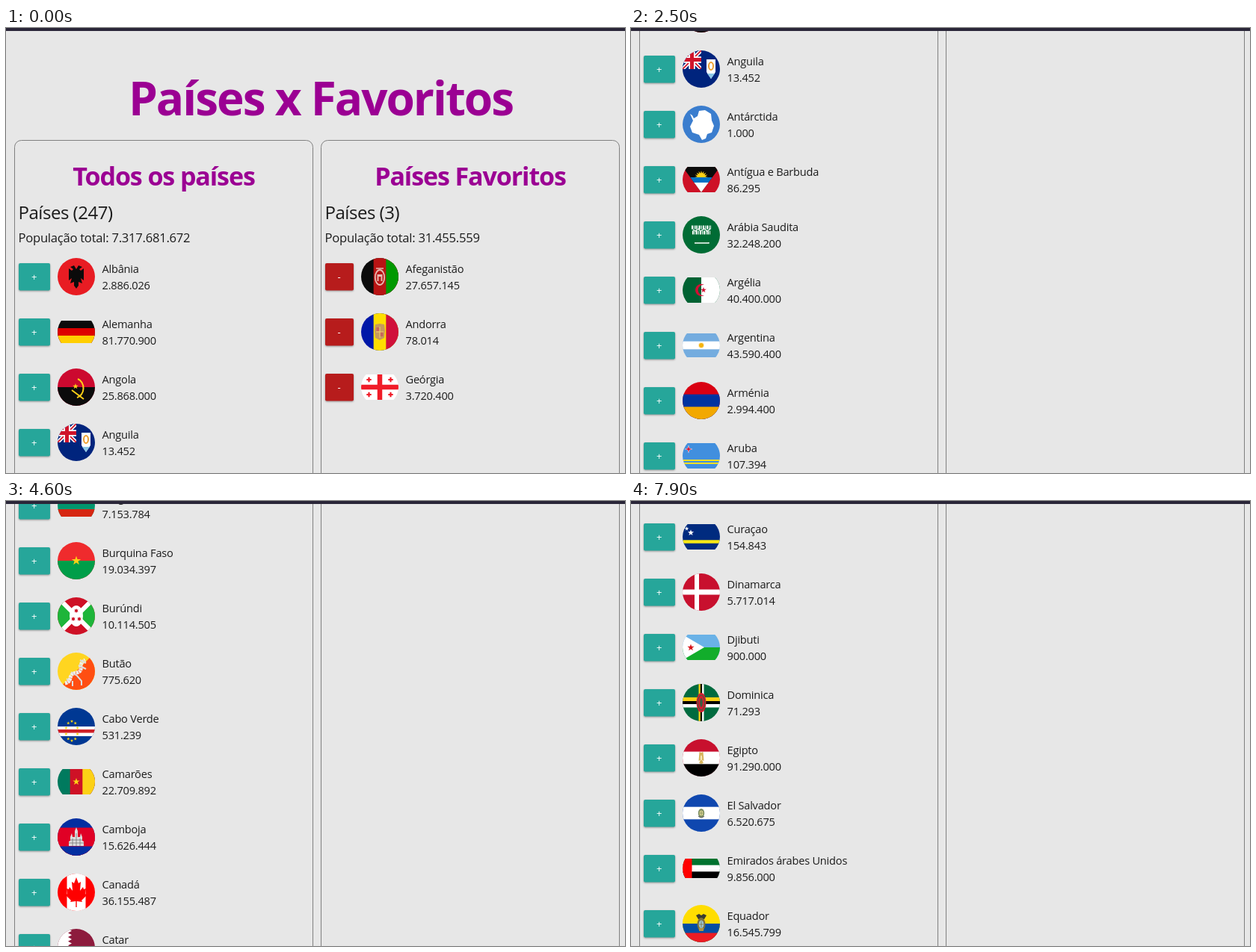
Animation, 828 px wide and 596 px high, one loop 8 s. Source, as an HTML page:

```html
<!DOCTYPE html>
<html lang="pt">
<head>
<meta charset="utf-8">
<title>Países x Favoritos</title>
<style>
html, body { margin: 0; width: 100%; height: 100%; overflow: hidden; background: #e7e7e7; }
#stage { display: block; width: 828px; height: 596px; }
text { font: 14.6px "Open Sans", "Noto Sans", sans-serif; letter-spacing: -.015em; fill: #1c1c1c; }
.title, .heading { font-size: 62px; font-weight: 700; letter-spacing: -.032em; fill: #9b0093; text-anchor: middle; }
.heading { font-size: 34px; }
.count { font-size: 24px; letter-spacing: -.02em; }
.total { font-size: 16.6px; }
.sign { font-size: 13px; fill: #fff; text-anchor: middle; }
.panel { fill: none; stroke: #808080; }
.button { filter: drop-shadow(0 1.5px 1.3px rgba(0, 0, 0, .36)); }
#page { animation: scroll 8s step-end infinite; }
@keyframes scroll {
  0% { transform: translateY(0); }
  16.25% { transform: translateY(-40px); }
  17.5% { transform: translateY(-150px); }
  18.75% { transform: translateY(-200px); }
  27.5% { transform: translateY(-201px); }
  28.75% { transform: translateY(-300px); }
  30% { transform: translateY(-440px); }
  31.25% { transform: translateY(-500px); }
  36.25% { transform: translateY(-520px); }
  37.5% { transform: translateY(-680px); }
  38.75% { transform: translateY(-840px); }
  40% { transform: translateY(-978px); }
  41.25% { transform: translateY(-1070px); }
  42.5% { transform: translateY(-1100px); }
  45% { transform: translateY(-1180px); }
  46.25% { transform: translateY(-1400px); }
  47.5% { transform: translateY(-1581px); }
  48.75% { transform: translateY(-1672px); }
  50% { transform: translateY(-1700px); }
  52.5% { transform: translateY(-1725px); }
  53.75% { transform: translateY(-1880px); }
  55% { transform: translateY(-2080px); }
  56.25% { transform: translateY(-2290px); }
  57.5% { transform: translateY(-2473px); }
  58.75% { transform: translateY(-2573px); }
  60% { transform: translateY(-2600px); }
  63.75% { transform: translateY(-2680px); }
  65% { transform: translateY(-2950px); }
  66.25% { transform: translateY(-3200px); }
  67.5% { transform: translateY(-3350px); }
  68.75% { transform: translateY(-3400px); }
  90% { transform: translateY(-3480px); }
  91.25% { transform: translateY(-3800px); }
  92.5% { transform: translateY(-4050px); }
  93.75% { transform: translateY(-4140px); }
  96.25% { transform: translateY(-4155px); }
  98.75%, 100% { transform: translateY(-4133px); }
}
</style>
</head>
<body>
<svg id="stage" viewBox="0 0 828 596">
  <defs><clipPath id="disc"><circle r="25"/></clipPath></defs>
  <g id="page">
    <text class="title" x="421" y="117">Países x Favoritos</text>
    <rect class="panel" x="11.5" y="150.5" width="399" height="18600" rx="9"/>
    <rect class="panel" x="421.5" y="150.5" width="399" height="18600" rx="9"/>
    <text class="heading" x="211" y="211">Todos os países</text>
    <text class="heading" x="621" y="211">Países Favoritos</text>
    <text class="count" x="16.5" y="256">Países (247)</text>
    <text class="count" x="426.5" y="256">Países (3)</text>
    <text class="total" x="16.5" y="287">População total: 7.317.681.672</text>
    <text class="total" x="426.5" y="287">População total: 31.455.559</text>
    <g id="all"></g>
    <g id="favorites"></g>
  </g>
  <rect width="828" height="4" fill="#2a2638"/>
</svg>
<script>
// Flag shapes: every flag is 50 wide and h high, origin at its top left.
const rect = (x, y, w, h, c) => `<rect x="${x}" y="${y}" width="${w}" height="${h}" fill="${c}"/>`;
const field = c => rect(0, 0, 50, 50, c);
const rows = (h, ...cs) => cs.map((c, i) => rect(0, i * h / cs.length, 50, h - i * h / cs.length, c)).join('');
const cols = (h, ...cs) => cs.map((c, i) => rect(i * 50 / cs.length, 0, 50 - i * 50 / cs.length, h, c)).join('');
const oval = (x, y, rx, ry, c, more = '') => `<ellipse cx="${x}" cy="${y}" rx="${rx}" ry="${ry}" fill="${c}" ${more}/>`;
const dot = (x, y, r, c) => oval(x, y, r, r, c);
const ring = (x, y, rx, ry, c, w) => oval(x, y, rx, ry, 'none', `stroke="${c}" stroke-width="${w}"`);
const poly = (c, pts) => `<polygon points="${pts}" fill="${c}"/>`;
const line = (c, w, d, dash = '') => `<path d="${d}" fill="none" stroke="${c}" stroke-width="${w}" stroke-dasharray="${dash}"/>`;
const range = n => [...Array(n).keys()];

function star(x, y, r, c, n = 5, inner = .4) {
  return poly(c, range(2 * n).map(i => {
    const a = i * Math.PI / n, q = i % 2 ? r * inner : r;
    return `${(x + q * Math.sin(a)).toFixed(2)},${(y - q * Math.cos(a)).toFixed(2)}`;
  }).join(' '));
}
// Left half of an outline, mirrored about the middle.
function mirrored(c, half) {
  const pts = half.split(' ').map(p => p.split(','));
  return poly(c, [...pts, ...pts.slice().reverse().map(([x, y]) => [50 - x, y])].join(' '));
}
function crescent(x, y, r, c) {
  const a = x + r * .5, d = r * .866, q = r * .88;
  return `<path fill="${c}" d="M${a} ${y - d}A${r} ${r} 0 1 0 ${a} ${y + d}A${q} ${q} 0 1 1 ${a} ${y - d}"/>`;
}
function jack(w, h, blue) {
  const cross = `M${w / 2} 0V${h}M0 ${h / 2}H${w}`, saltire = `M0 0L${w} ${h}M${w} 0L0 ${h}`;
  return `<svg width="${w}" height="${h}">` + field(blue) + line('#fff', h / 5, saltire) +
    line('#cf142b', h / 14, saltire) + line('#fff', h / 3, cross) + line('#cf142b', h / 5, cross) + '</svg>';
}
function teeth(h, n, x, tip, c) {
  const step = h / n;
  return poly(c, '0,0 ' + range(n).map(i => `${x},${i * step} ${tip},${(i + .5) * step}`).join(' ') + ` ${x},${h} 0,${h}`);
}
const seal = (x, y, rx, ry, a, b) => oval(x, y, rx, ry, a) + oval(x, y, rx * .6, ry * .6, b) +
  line(a, .8, `M${x - rx * .5} ${y}h${rx}M${x} ${y - ry * .5}v${ry}`);

const gold = '#ffd116', red = '#ce1126', white = '#fff', black = '#0b0b0b';

const countries = [
  ['Albânia', '2.886.026', 50, field('#e81c23') +
    mirrored(black, '25,15 22,10 17,12 21,15 19,17 15,14 15,30 19,27 17,34 22,32 22,37 25,41')],
  ['Alemanha', '81.770.900', 30, rows(30, black, '#d00', '#ffce00')],
  ['Angola', '25.868.000', 50, rows(50, '#cc092f', black) +
    line(gold, 2, 'M27 14A11 13 0 0 1 26 39M19 29L35 41') + star(24, 24, 4, gold)],
  ['Anguila', '13.452', 50, field('#00247d') + jack(25, 25, '#00247d') +
    poly(white, '32,12 44,12 44,29 38,38 32,29') + poly('#8cc8e8', '33,31 43,31 38,38') +
    ring(38, 21, 3, 5, '#f0a030', 2)],
  ['Antárctida', '1.000', 50, field('#3a7dce') +
    poly(white, '10,11 13,13 15,17 20,14 22,7 30,6 38,11 39,20 42,27 39,36 33,38 31,44 26,46 22,39 13,36 10,28 14,20')],
  ['Antígua e Barbuda', '86.295', 34, field(red) + poly(black, '0,0 50,0 25,34') + star(25, 14, 9, gold, 16, .6) +
    poly('#0072c6', '10.3,14 39.7,14 34.6,21 15.4,21') + poly(white, '15.4,21 34.6,21 25,34')],
  ['Arábia Saudita', '32.248.200', 50, field('#006c35') +
    line(white, 5, 'M12 15h26M13 22h25', '2 1 1 1') + line(white, 1.3, 'M14 18l3 2 4-3 3 3 5-3 4 3 4-3M16 36h19v-1')],
  ['Argélia', '40.400.000', 34, cols(34, '#006233', white) + crescent(25, 17, 8, '#d21034') + star(28, 17, 4, '#d21034')],
  ['Argentina', '43.590.400', 32, rows(32, '#74acdf', white, '#74acdf') + star(25, 16, 4, '#f6b40e', 16, .7)],
  ['Arménia', '2.994.400', 50, rows(50, '#d90012', '#0033a0', '#f2a800')],
  ['Aruba', '107.394', 34, field('#418fde') + rect(0, 22, 50, 2, '#fbe122') + rect(0, 26, 50, 2, '#fbe122') +
    star(8, 8, 5.5, white, 4, .35) + star(8, 8, 4.5, '#d21034', 4, .3)],
  ['Austrália', '24.117.360', 26, field('#00008b') + jack(25, 13, '#00008b') + star(12.5, 19.5, 3.8, white, 7, .5) +
    star(38, 4.5, 1.8, white, 7) + star(32, 11, 1.8, white, 7) + star(43, 9, 1.8, white, 7) + star(38, 21, 1.8, white, 7)],
  ['áustria', '8.725.931', 50, rows(50, '#ed2939', white, '#ed2939')],
  ['Azerbaijão', '9.730.500', 50, rows(50, '#0098c3', '#e00034', '#00ae65') +
    ring(24.5, 25, 3.4, 6.5, white, 1.6) + rect(26, 20, 3, 10, '#e00034') + star(28, 25, 3.2, white, 8, .5)],
  ['Baamas', '378.040', 50, rows(50, '#00abc9', '#fae042', '#00abc9') + poly('#000', '0,0 22,25 0,50')],
  ['Bangladeche', '161.006.790', 30, field('#006a4e') + dot(22.5, 15, 10, '#f42a41')],
  ['Barbados', '285.000', 34, cols(34, '#00267f', '#ffc726', '#00267f') +
    line('#000', 1.8, 'M25 8V26M19 10q2 4 1 10h10q-1-6 1-10')],
  ['Barém', '1.404.900', 30, field(red) + teeth(30, 5, 13, 21, white)],
  ['Bélgica', '11.319.511', 50, cols(50, '#111', '#fae042', '#ed2939')],
  ['Belize', '370.300', 50, field('#003f87') + rect(0, 0, 50, 5, red) + rect(0, 45, 50, 5, red) +
    oval(25, 25, 13, 21, white) + ring(25, 25, 11, 18, '#5a9b45', 1.5) +
    poly('#7fb2d5', '19,20 31,20 30,30 25,35 20,30') + rect(18, 22, 4, 11, '#a56c42') +
    rect(29, 22, 3, 11, '#5b432f') + oval(25, 16, 6, 4, '#448a3e') + rect(22, 24, 6, 6, gold)],
  ['Benim', '10.653.654', 34, rows(34, '#fcd116', '#e8112d') + rect(0, 0, 20, 34, '#008751')],
  ['Bermudas', '61.954', 50, field('#cf142b') + jack(25, 25, '#00247d') + rect(32, 12, 12, 26, white) +
    rect(32, 32, 12, 7, '#2f8b3a') + oval(38, 24, 4, 8, '#b3343a') + oval(38, 24, 2, 4, '#6d8b99')],
  ['Bielorrússia', '9.498.700', 26, field('#c8313e') + rect(0, 17, 50, 9, '#4aa657') + rect(0, 0, 6, 26, white) +
    line('#c8313e', 1.5, 'M1.5 0V26M4.5 1V26', '2 1')],
  ['Bolívia', '10.985.059', 50, rows(50, '#d52b1e', '#f9e300', '#007934')],
  ['Bonaire', '17.408', 50, field(white) + poly('#003087', '50,4 50,50 4,50') + poly('#f9d616', '0,0 21,0 0,19') +
    ring(14, 21, 6.5, 9, '#000', 1.3) + line('#000', 1.5, 'M14 10v3M14 29v3M6 21h3M19 21h3') + star(14, 21, 6, '#dc143c', 6, .55)],
  ['Bósnia e Herzegovina', '3.531.159', 25, field('#002395') + poly('#fecb00', '13,0 38,0 38,25') +
    range(7).map(i => star(10 + i * 4, i * 4, 2, white)).join('')],
  ['Botsuana', '2.141.206', 34, field('#75aadb') + rect(0, 12, 50, 10, white) + rect(0, 14, 50, 6, '#000')],
  ['Brasil', '206.135.893', 34, field('#009c3b') + poly('#ffdf00', '4,17 25,3 46,17 25,31') + dot(25, 17, 8, '#002776') +
    line(white, 1.2, 'M17 15q9-1 15 5')],
  ['Brunei', '411.900', 25, field('#f7e017') + poly(white, '0,0 50,17 50,24 0,7') + poly('#000', '0,7 50,24 50,29 0,12') +
    line('#cf1126', 1.6, 'M18 11q7 9 14 0M25 4V20')],
  ['Bulgária', '7.153.784', 30, rows(30, white, '#00966e', '#d62612')],
  ['Burquina Faso', '19.034.397', 50, rows(50, '#ef2b2d', '#009e49') + star(25, 25, 6.5, '#fcd116')],
  ['Burúndi', '10.114.505', 50, field(red) + poly('#1eb53a', '0,0 25,25 0,50') + poly('#1eb53a', '50,0 25,25 50,50') +
    line(white, 6, 'M0 0L50 50M50 0L0 50') + oval(25, 25, 9, 14, white) +
    star(25, 18, 3, red, 6, .55) + star(21, 29, 3, red, 6, .55) + star(29, 29, 3, red, 6, .55)],
  ['Butão', '775.620', 50, field('#ffd520') + poly('#ff4e12', '50,0 50,50 0,50') +
    line('#eee', 5, 'M10 41q6-1 7-7t8-7 6-7 6-10', '3 .6') +
    line('#ddd', 2, 'M12 35l5 4M20 38v7M18 26l8 5 6 7v6M28 17l10 5M30 10l8 4')],
  ['Cabo Verde', '531.239', 50, field('#003893') + rect(0, 25, 50, 13, white) + rect(0, 29, 50, 4.5, '#cf2027') +
    range(10).map(i => star(19 + 8 * Math.sin(i * .628), 31 + 13 * Math.cos(i * .628), 2.3, '#f7d116')).join('')],
  ['Camarões', '22.709.892', 34, cols(34, '#007a5e', red, '#fcd116') + star(25, 17, 5, '#fcd116')],
  ['Camboja', '15.626.444', 50, rows(50, '#032ea1', '#e00025', '#e00025', '#032ea1') +
    mirrored('#ddd', '25,12 23,17 23,25 20,25 19,20 17,25 17,30 15,31 15,37 25,37') +
    line('#777', .8, 'M15 33H35M17 29H33M20 27v10M25 20v17M30 27v10')],
  ['Canadá', '36.155.487', 50, cols(50, '#f00', white, white, '#f00') +
    mirrored('#f00', '25,5 22,13 19,11 20,23 16,18 15,21 12,20 13,27 11,29 18,36 17,38 24.3,37 24.3,45')],
  ['Catar', '2.587.564', 50, field('#8d1b3d') + teeth(50, 9, 14, 19, white)],
  ['Cazaquistão', '17.753.200', 25, field('#00afca') + star(25, 10, 6, '#fec50c', 18, .7) +
    line('#fec50c', 1.5, 'M15 15q10 9 20 0M2 0V25')],
  ['Chade', '14.497.000', 34, cols(34, '#002664', '#fecb00', '#c60c30')],
  ['Chile', '18.191.900', 34, rows(34, white, '#d52b1e') + rect(0, 0, 17, 17, '#0039a6') + star(8.5, 8.5, 4.5, white)],
  ['China', '1.377.422.166', 34, field('#de2910') + star(9, 9, 5, '#ffde00') +
    range(4).map(i => star(18 - Math.abs(i - 1.5), 4 + i * 4, 1.6, '#ffde00')).join('')],
  ['Chipre', '847.000', 50, field(white) +
    poly('#d57800', '38,9 32,14 24,15 21,20 14,20 11,26 15,30 19,30 25,28 30,26 32,21 31,18') +
    line('#68734a', 2, 'M13 33q4 7 11 8M37 32q-4 8-11 9', '2 1')],
  ['Colômbia', '48.759.958', 50, rows(50, gold, gold, '#003893', red)],
  ['Comores', '806.153', 50, rows(50, '#ffc61e', white, red, '#3a75c4') + poly('#3d8e33', '0,0 25,25 0,50') +
    line(white, 2.6, 'M10 14Q-1 25 10 36') + line(white, 2, 'M10 17V34', '2 2.7')],
  ['Congo', '4.741.000', 34, field('#009543') + poly('#fbde4a', '0,34 33,0 50,0 17,34') + poly('#dc241f', '50,0 50,34 17,34')],
  ['Coreia do Norte', '25.281.000', 26, field('#024fa2') + rect(0, 4, 50, 18, white) + rect(0, 5.5, 50, 15, '#ed1c27') +
    dot(17, 13, 6, white) + star(17, 13, 5.5, '#ed1c27')],
  ['Coreia do Sul', '50.801.405', 34, field(white) + dot(25, 17, 8.5, '#c60c30') +
    '<path fill="#003478" d="M18 12.3a4.2 4.2 0 0 0 7 4.7a4.2 4.2 0 0 1 7 4.7a8.5 8.5 0 0 1-14-9.4"/>' +
    [[12, 8, -56], [38, 8, 56], [12, 26, 56], [38, 26, -56]].map(([x, y, a]) =>
      `<g transform="translate(${x} ${y}) rotate(${a})">${line('#000', 1.5, 'M-4-2.6h8M-4 0h8M-4 2.6h8', a > 0 ? '3.6 .8' : '')}</g>`).join('')],
  ['Costa do Marfim', '22.671.331', 50, cols(50, '#f77f00', white, '#009e60')],
  ['Costa Rica', '4.890.379', 30, rows(30, '#002b7f', white, red, red, white, '#002b7f')],
  ['Croácia', '4.190.669', 25, rows(25, '#f00', white, '#171796') + rect(20, 6, 10, 12, '#f00') +
    line(white, 2, 'M21 9h8M21 13h8', '2 2')],
  ['Cuba', '11.239.004', 25, rows(25, '#002a8f', white, '#002a8f', white, '#002a8f') +
    poly('#cf142b', '0,0 21,12.5 0,25') + star(7, 12.5, 4, white)],
  ['Curaçao', '154.843', 34, field('#002b7f') + rect(0, 21.3, 50, 4.4, '#f9e814') + star(5.5, 6, 3, white) + star(11, 11.5, 4.3, white)],
  ['Dinamarca', '5.717.014', 50, field('#c8102e') + rect(16, 0, 6, 50, white) + rect(0, 21.5, 50, 7, white)],
  ['Djibuti', '900.000', 34, rows(34, '#6ab2e7', '#12ad2b') + poly(white, '0,0 29,17 0,34') + star(11, 17.3, 4.8, '#d7141a')],
  ['Dominica', '71.293', 50, field('#006b3f') +
    rect(0, 18, 50, 5, '#fcd116') + rect(0, 23, 50, 4, '#000') + rect(0, 27, 50, 4.5, white) +
    rect(21.5, 0, 2.4, 50, '#fcd116') + rect(23.9, 0, 2.2, 50, '#000') + rect(26.1, 0, 2.4, 50, white) +
    oval(25, 25, 6.5, 13, '#d41c30') + ring(25, 25, 4.5, 10, '#2c6b3c', 1) + oval(25, 25, 1.8, 6, '#3c5c41')],
  ['Egipto', '91.290.000', 50, rows(50, '#c8102e', white, '#000') +
    mirrored('#d6b45c', '25,18 22.5,17 21.5,29 24,28 22,32 25,33') + oval(25, 25, 1.2, 3.5, '#f5e6b8')],
  ['El Salvador', '6.520.675', 50, rows(50, '#0f47af', white, '#0f47af') +
    seal(25, 25, 4.2, 6, '#7b8d62', '#e0d68f') + line('#555', 1, 'M21 29q4 4 8 0')],
  ['Emirados árabes Unidos', '9.856.000', 26, rows(26, '#00732f', white, '#000') + rect(0, 0, 12.5, 26, '#f00')],
  ['Equador', '16.545.799', 50, rows(50, '#ffdd00', '#ffdd00', '#034ea2', '#ed1c24') +
    mirrored('#3a3b2e', '25,14 22,12 18,14 21,19 25,20') + seal(25, 26, 5.5, 9, '#7c7140', '#9ac7d9') +
    rect(22, 31, 6, 4, '#b09340')],
];

const favorites = [
  ['Afeganistão', '27.657.145', 50, cols(50, black, '#b81414', '#009900') +
    ring(25, 26, 6.2, 10, '#e6b8b0', 1.8) + rect(21.5, 22, 7, 9, '#e6b8b0') + rect(23.5, 25, 3, 6, '#b81414') +
    line('#e6b8b0', 1.5, 'M20 14h10')],
  ['Andorra', '78.014', 50, cols(50, '#0018a8', '#fedf00', '#d0103a') +
    mirrored('#c79a5d', '25,14 19,15 18,23 19,33 25,36') + rect(20.5, 19, 4, 5, '#c8665a') +
    rect(25.5, 25, 4, 6, '#c8665a') + line('#f2cf70', 1, 'M20 25h10M25 18v15')],
  ['Geórgia', '3.720.400', 34, field(white) + line('#f01c28', 6.5, 'M25 0V34M0 17H50') +
    [10.5, 39.5].map(x => [7, 27].map(y => line('#f01c28', 2.2, `M${x - 3.2} ${y}h6.4M${x} ${y - 3.2}v6.4`)).join('')).join('')],
];

function draw(id, list, left, width, color, sign) {
  const flagX = left + width + 35;
  document.getElementById(id).innerHTML = list.map(([name, people, h, flag], i) => `
    <g transform="translate(0 ${333 + 74 * i})">
      <rect class="button" x="${left}" y="-18" width="${width}" height="36.5" rx="2" fill="${color}"/>
      <text class="sign" x="${left + width / 2 - .5}" y="5">${sign}</text>
      <g transform="translate(${flagX} 0)" clip-path="url(#disc)">
        <svg x="-25" y="${-h / 2}" width="50" height="${h}">${flag}</svg>
      </g>
      <text x="${flagX + 34.5}" y="-5">${name}</text>
      <text x="${flagX + 34.5}" y="17">${people}</text>
    </g>`).join('');
}
draw('all', countries, 17, 42, '#26a69a', '+');
draw('favorites', favorites, 427, 38, '#b71c1c', '-');
</script>
</body>
</html>
```
